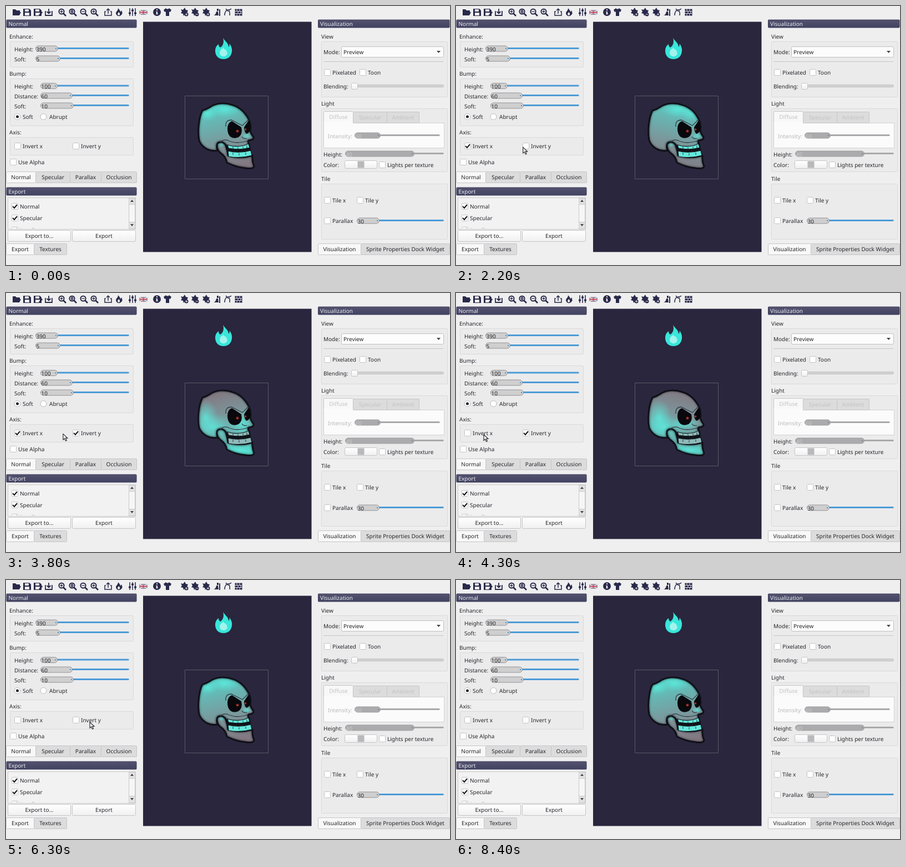
An HTML page for the animation above (9 s loop, 800 by 468 pixels).

```html
<!DOCTYPE html>
<html lang="en">
<head>
<meta charset="utf-8">
<title>Normal map axis inversion</title>
<style>
html, body { margin: 0; width: 100%; height: 100%; overflow: hidden; background: #efeff0; }
svg { display: block; width: 800px; height: 468px; }
text { font: 10px "Noto Sans", "Open Sans", sans-serif; fill: #27272b; text-rendering: geometricPrecision; white-space: pre; }
</style>
</head>
<body>
<svg id="stage" viewBox="0 0 800 468" xmlns="http://www.w3.org/2000/svg">
  <defs>
    <linearGradient id="btn" x2="0" y2="1"><stop stop-color="#fff"/><stop offset="1" stop-color="#f0f0f1"/></linearGradient>
    <linearGradient id="title" x2="0" y2="1"><stop stop-color="#53536f"/><stop offset="1" stop-color="#424262"/></linearGradient>
    <linearGradient id="bone" gradientUnits="userSpaceOnUse">
      <stop stop-color="#58d2c7"/><stop offset=".28" stop-color="#68b3b1"/>
      <stop offset=".6" stop-color="#7b979b"/><stop offset="1" stop-color="#837680"/>
    </linearGradient>
    <radialGradient id="glow"><stop stop-color="#5bf0e0" stop-opacity=".75"/><stop offset="1" stop-color="#5be8dc" stop-opacity="0"/></radialGradient>
    <filter id="soft" x="-20%" y="-20%" width="140%" height="140%"><feGaussianBlur stdDeviation="1.8"/></filter>
    <clipPath id="list"><rect x="4" y="347" width="217" height="55"/></clipPath>
    <path id="head" d="M354 189Q361 187 367 183C378 175 395 174 408 179C422 183 432 194 438 206Q442 214 440 226Q442 232 446 237Q447 242 437 243Q435 246 438 249L439 256Q420 261 400 257L396 251Q389 243 382 247Q378 252 381 261C367 264 353 256 348 243C345 228 347 202 354 189Z"/>
    <path id="jaw" d="M380 249Q389 242 395 250Q399 259 400 270Q421 277 444 270Q443 280 447 290Q445 295 432 293C418 292 409 288 398 283Q396 272 387 266Q379 260 380 249Z"/>
    <clipPath id="skullClip"><use href="#head"/><use href="#jaw"/></clipPath>
  </defs>
  <g id="ui"></g>
  <g id="canvas">
    <path fill="#29263d" d="M247 28.500h303.500v416H247z"/>
    <path fill="none" stroke="#5c5968" d="M322.500 162.500h150v150h-150z"/>
    <path fill="#38e6da" d="M391 57C393 63 401 66 401 74Q403 72 403 68Q408 76 407 82C406 91 400 96 392 96C383 96 377 90 377 81C377 75 380 71 383 69Q383 73 386 75C392 71 393 65 391 57Z"/>
    <path fill="#a2f3ed" d="M391 74Q392 78 396 79Q400 84 398 88Q395 92 391 91Q385 90 385 84Q386 80 388 78Q391 78 391 74Z"/>
    <g stroke="#101018" stroke-width="3" stroke-linejoin="round">
      <path fill="#11131a" d="M396 252L438 253L442 270L400 275Z"/>
      <use href="#jaw" fill="url(#bone)"/>
      <use href="#head" fill="url(#bone)"/>
    </g>
    <g clip-path="url(#skullClip)">
      <g id="glows"></g>
      <g fill="none" stroke="#14161e" stroke-width="5" opacity=".45" filter="url(#soft)"><use href="#head"/><use href="#jaw"/></g>
    </g>
    <g fill="none" stroke="#101018" stroke-width="1.800" stroke-linejoin="round"><use href="#head"/><use href="#jaw"/></g>
    <path fill="none" stroke="#343b43" stroke-width="1.300" d="M396 218Q395 206 406 206L426 216L437 205M386 246Q394 239 402 244Q418 250 436 243M425 236Q428 241 434 239"/>
    <path fill="#08080d" d="M399 222Q399 211 407 208L424 219Q427 231 419 237Q410 241 404 236Q399 231 399 222ZM429 219L437 207Q441 214 440 222Q439 230 433 231Q429 227 429 219Z"/>
    <g fill="#7f251f"><circle cx="417" cy="226" r="2.600"/><circle cx="431.500" cy="223" r="2"/></g>
    <g fill="#d85036"><circle cx="417" cy="226" r="1"/><circle cx="431.500" cy="223" r=".8"/></g>
    <g id="teeth" stroke="#11161b" stroke-width="1.200">
      <path d="M399 251Q419 257 437 249L439 256Q420 261 401 257Z"/>
      <path d="M400 262Q421 267 441 261L443 270Q422 276 401 272Z"/>
      <path fill="none" stroke-width=".8" d="M409 254v4M418 255v4M427 254v4M434 252v5M409 265v4M420 266v4M432 265v4"/>
    </g>
  </g>
  <g id="marks" fill="none" stroke="#17171b" stroke-width="2">
    <path id="markX" d="M17 253l3 3 5-6"/><path id="markY" d="M122 253l3 3 5-6"/>
  </g>
  <path id="cursor" fill="#f6f6f6" stroke="#25252c" stroke-width="1.100" d="M0 0v10.500l2.600-2.300 2 4.300 1.900-.9-2-4.100h3.500z"/>
</svg>
<script>
const $ = id => document.getElementById(id);
const out = [];
const add = s => out.push(s);
const path = (d, fill = 'none', extra = '') => add(`<path d="${d}" fill="${fill}" ${extra}/>`);
const rect = (x, y, r, b, fill, stroke = 'none', rx = 0) =>
  add(`<rect x="${x + .5}" y="${y + .5}" width="${r - x - 1}" height="${b - y - 1}" rx="${rx}" fill="${fill}" stroke="${stroke}"/>`);
const text = (x, cy, s, fill = '#27272b', anchor = 'start') =>
  add(`<text x="${x}" y="${cy + 3.7}" text-anchor="${anchor}" style="fill:${fill}">${s}</text>`);
const group = (x, y, r, b) => rect(x, y, r, b, '#ebebec', '#d9d9da', 1);
const check = (x, cy, label, on) => {
  rect(x, cy - 6, x + 12, cy + 6, '#fff', '#c3c3c5', 1);
  if (on) path(`M${x + 2} ${cy}l3 3 5-6`, 'none', 'stroke="#17171b" stroke-width="2"');
  text(x + 15, cy, label);
};
const title = (x, y, r, s) => {
  rect(x, y, r, y + 15, 'url(#title)', '#41415f', 1);
  text(x + 4, y + 7.8, s, '#f0f0f5');
};
const tab = (x, y, r, s, on, color) => {
  rect(x, y, r, y + 21, on ? '#f8f8f8' : '#dcdcdd', '#c6c6c8', 1);
  text((x + r) / 2, y + 10.5, s, color, 'middle');
};
const button = (x, y, r, b, s = '') => {
  rect(x, y, r, b, 'url(#btn)', '#c5c5c7', 2);
  text((x + r) / 2, (y + b) / 2, s, undefined, 'middle');
};
const slider = (label, lx, x, knob, end, cy, value, off) => {
  text(lx, cy + 1, label, off && lx > 575 ? '#b9b9bb' : undefined);
  rect(knob - 2, cy - 2.5, end, cy + 1.5, off ? '#a9a9ab' : '#4b9bd6', 'none', 1);
  rect(x, cy - 5.5, knob, cy + 5.5, off ? '#ababad' : '#cfcfd0', off ? '#a0a0a2' : '#929295', 5);
  text(x + 1.5, cy + .8, value, off ? '#cacacc' : undefined);
  add(`<circle cx="${knob - 4}" cy="${cy}" r="1" fill="${off ? '#777' : '#357caf'}"/>`);
};

function toolbar() {
  const ink = '#29294a';
  const line = (d, w = 2) => path(d, 'none', `stroke="${ink}" stroke-width="${w}"`);
  path('M12 6h5l2 2h6v3h-9l-4 6zM16 11h11l-3 6H12z', ink);
  for (const x of [31, 50]) {
    path(`M${x} 5h11l3 3v10h-14z`, ink);
    path(`M${x + 3} 6h7v4h-7zM${x + 3} 12h8v5h-8z`, '#efeff0');
  }
  path('M59 16l6-6 1 2-6 6z', ink);
  line('M71 9v8h12V9', 1.8);
  line('M77 5v8M73.5 10l3.5 3.5 3.5-3.5', 1.8);
  for (const [i, x] of [100, 119, 139, 158].entries()) {
    add(`<circle cx="${x}" cy="10" r="4.6" fill="none" stroke="${ink}" stroke-width="2"/>`);
    line(`M${x + 3} 13l5 5`, 2.5);
    line(`M${x - 2.5} 10h5` + (i % 3 ? '' : `M${x} 7.5v5`) + (i == 1 ? `M${x - 2} 8h4M${x - 2} 12h4` : ''), 1.3);
  }
  line('M180 10h-2v7h12v-7h-2M184 14V5M181 8l3-3 3 3', 1.5);
  path('M202 4Q206 8 206 11L208 8Q211 13 208 16Q204 20 200 17Q196 13 200 9Q202 7 202 4Z', ink);
  path('M203 11q4 3 1 6q-3 0-3-3z', '#efeff0');
  line('M223 4v14M228 4v14M233 4v14', 1.5);
  line('M221 13h4M226 8h4M231 13h4', 3);
  rect(240, 7, 255, 16, '#293770');
  path('M240 7l15 9M255 7l-15 9', 'none', 'stroke="#eee" stroke-width="2"');
  path('M247.5 7v9M240 11.5h15', 'none', 'stroke="#eee" stroke-width="3.5"');
  path('M247.5 7v9M240 11.5h15', 'none', 'stroke="#c34050" stroke-width="1.8"');
  add(`<circle cx="272" cy="11" r="7" fill="${ink}"/>`);
  path('M271 6h2v2h-2zM270 10h3v4h1v1h-4v-1h1v-3h-1z', '#f4f4f4');
  path('M288 4q3 3 6 0l4 3-2 4-2-1v8h-6v-8l-2 1-2-4z', ink);
  for (const [i, x] of [321, 340, 360].entries()) {
    path(`M${x - 6} 6l4 1 3-4 2 4 4 1-2 4 2 3-5-1-3 4-1-4-4-1 2-3z`, ink);
    add(`<circle cx="${x + 4}" cy="15" r="3.5" fill="${ink}"/>`);
    path(`M${x + 2} 15h4` + (i == 1 ? '' : `M${x + 4} 13v4`), 'none', 'stroke="#efeff0"');
  }
  path('M374 17q4-1 5-7h3l1 7zM380 5h3v4h-3zM384 6h2v12h-2z', ink);
  line('M394 17q0-9 6-10q4 0 6-2M396 5l5 5M402 8q2 5 1 9', 1.5);
  rect(412, 5, 426, 18, ink);
  path('M412 9.5h13M412 13.5h13M416 5v4M421 5v4M418 10v4M423 10v4M416 14v4M421 14v4', 'none', 'stroke="#dddde3"');
}

function leftPanel() {
  title(.5, 24.5, 235.5, 'Normal');
  text(6, 55, 'Enhance:');
  group(7, 64, 230, 111);
  slider('Height:', 15, 53, 94, 222, 77, '390');
  slider('Soft:', 15, 53, 98, 222, 95, '5');
  text(6, 122, 'Bump:');
  group(7, 131, 230, 217);
  slider('Height:', 15, 62, 93, 222, 144.5, '100');
  slider('Distance:', 15, 62, 120, 222, 162, '60');
  slider('Soft:', 15, 62, 122, 222, 180, '10');
  for (const x of [20, 67]) add(`<circle cx="${x + .5}" cy="200" r="5.5" fill="#fff" stroke="#b9b9bc"/>`);
  add('<circle cx="20.5" cy="200" r="2.5" fill="#222226"/>');
  text(30, 200, 'Soft');
  text(78, 200, 'Abrupt');
  text(6, 228, 'Axis:');
  group(7, 237, 230, 270);
  check(15, 253, 'Invert x');
  check(120, 253, 'Invert y');
  check(7, 282, 'Use Alpha');
  tab(53, 299, 116, 'Specular');
  tab(115, 299, 172, 'Parallax');
  tab(171, 299, 236, 'Occlusion');
  tab(0, 299, 54, 'Normal', true);
  title(.5, 327.5, 235.5, 'Export');
  rect(3, 346, 234, 404, '#f2f2f3', '#cbcbcd');
  add('<g clip-path="url(#list)">');
  check(10, 362, 'Normal', true);
  check(10, 383, 'Specular', true);
  check(10, 405, 'Parallax', true);
  add('</g>');
  rect(221, 347, 233, 403, '#e2e2e3', '#d0d0d2');
  rect(221, 358, 233, 391, '#f6f6f6', '#c8c8ca');
  path('M224 354l3-4 3 4zM224 394l3 4 3-4z', '#444449');
  button(3, 405, 117, 426, 'Export to...');
  button(119, 405, 234, 426, 'Export');
  tab(50, 429, 110, 'Textures');
  tab(0, 429, 51, 'Export', true);
}

function rightPanel() {
  const faint = '#c3c3c5';
  title(562, 24.5, 799.5, 'Visualization');
  text(568, 55, 'View');
  group(568, 64, 796, 165);
  text(572, 83, 'Mode:');
  rect(604, 73, 789, 93, '#fcfcfc', '#c0c0c2', 2);
  text(608, 83, 'Preview');
  path('M776 81h7l-3.5 4z', '#454549');
  path('M572 100.5h216', 'none', 'stroke="#c4c4c6"');
  check(573, 120, 'Pixelated');
  check(637, 120, 'Toon');
  text(572, 145, 'Blending:');
  rect(622, 142, 789, 147, '#d3d3d5', '#c0c0c2', 2);
  button(622, 139, 634, 151);
  text(568, 176, 'Light');
  group(568, 185, 796, 300);
  rect(572, 211, 790, 257, '#fbfbfb', '#d2d2d4');
  tab(625, 191, 687, 'Specular', false, faint);
  tab(686, 191, 745, 'Ambient', false, faint);
  tab(572, 190, 626, 'Diffuse', true, faint);
  path('M573 209h52v4h-52z', '#fbfbfb');
  slider('Intensity:', 580, 628, 675, 782, 234, '60', true);
  slider('Height:', 572, 611, 736, 789, 267, '40', true);
  text(572, 287, 'Color:');
  button(610, 279, 669, 294);
  rect(633, 280, 646, 293, '#b9b9bb');
  check(672, 287, 'Lights per texture');
  text(568, 312, 'Tile');
  group(568, 321, 796, 422);
  check(573, 351, 'Tile x');
  check(632, 351, 'Tile y');
  check(573, 388, 'Parallax');
  slider('', 0, 632, 673, 789, 388, '30');
  tab(639, 429, 800, 'Sprite Properties Dock Widget');
  tab(562, 429, 640, 'Visualization', true);
}

toolbar();
leftPanel();
rightPanel();
$('ui').innerHTML = out.join('');

const LOOP = 9000;
// Pointer stops: time, x, y
const stops = [
  [100, 766, 430], [1000, 22, 254], [1200, 20, 258], [1400, 26, 256], [1600, 26, 256],
  [2500, 168, 255], [2900, 169, 253], [3300, 169, 253], [4200, 50, 256], [4400, 50, 256],
  [5300, 153, 256], [5800, 153, 256], [6000, 151, 257], [6300, 151, 257], [7200, 387, 298], [7800, 790, 412]
];
const within = (t, a, b) => t >= a && t < b;

function shade(flipX, flipY) {
  const set = (name, v) => $('bone').setAttribute(name, v);
  const tilt = flipX ? -14 : 14;
  set('x1', 397 - tilt); set('x2', 397 + tilt);
  set('y1', flipY ? 290 : 176); set('y2', flipY ? 176 : 294);
  const spots = flipY
    ? [[374, 242, 36, 24], [flipX ? 360 : 366, 225, 22, 32], [420, 284, 36, 10], [flipX ? 425 : 412, 236, 26, flipX ? 26 : 12]]
    : [[flipX ? 400 : 394, 187, 28, 14], [flipX ? 425 : 363, 194, 19, 13], [434, 235, 10, 6], [388, 250, 8, 5]];
  $('glows').innerHTML = spots.map(([x, y, rx, ry]) =>
    `<ellipse cx="${x}" cy="${y}" rx="${rx}" ry="${ry}" fill="url(#glow)"/>`).join('');
  $('teeth').setAttribute('fill', flipY ? '#8fb9b9' : '#65e9dc');
}

function point(t) {
  const i = stops.findIndex(s => s[0] > t);
  if (i < 1) return null;
  const [a, x, y] = stops[i - 1], [b, u, v] = stops[i];
  const k = (t - a) / (b - a);
  return [x + (u - x) * k, y + (v - y) * k];
}

let lit = '';
function draw(now) {
  const t = Math.floor(now % LOOP / 100) * 100;
  const at = point(t);
  $('cursor').style.display = at ? '' : 'none';
  if (at) $('cursor').setAttribute('transform', `translate(${at})`);
  $('markX').style.display = within(t, 1600, 4200) ? '' : 'none';
  $('markY').style.display = within(t, 2600, 5500) ? '' : 'none';
  const flips = [within(t, 1700, 4300), within(t, 2700, 5800)];
  if (lit !== String(flips)) shade(...flips);
  lit = String(flips);
}

const start = performance.now();
function tick() {
  draw(performance.now() - start);
  requestAnimationFrame(tick);
}
tick();
</script>
</body>
</html>
```
